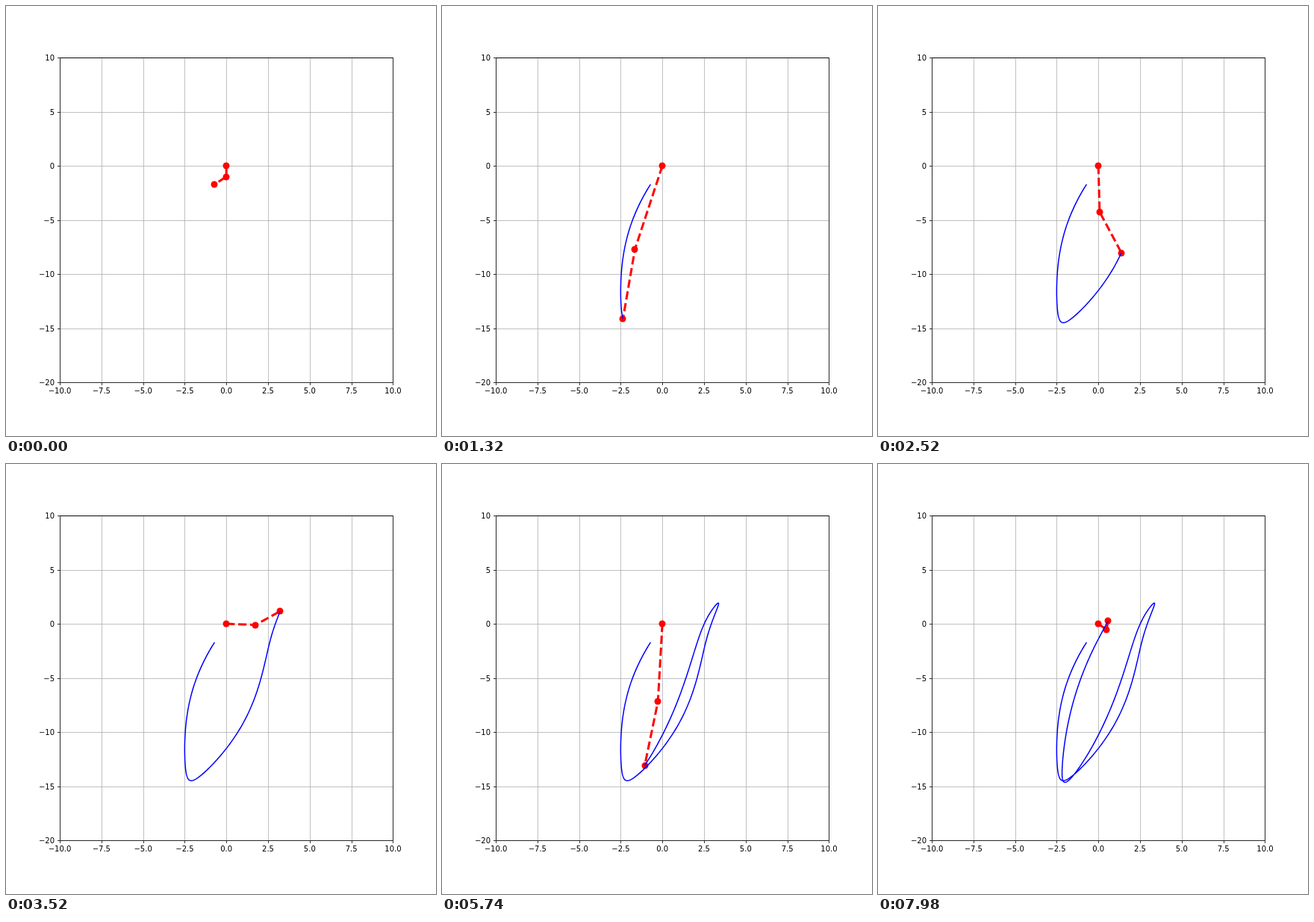
Animation, 576 px wide and 576 px high, one loop 8000 ms. Source, as an HTML page with a canvas:

```html
<!DOCTYPE html>
<html lang="en">
<head>
<meta charset="utf-8">
<title>Double spring pendulum</title>
<style>
  html, body { margin: 0; width: 100%; height: 100%; overflow: hidden; background: #fff; }
  canvas { display: block; width: 576px; height: 576px; }
</style>
</head>
<body>
<canvas id="stage" width="576" height="576"></canvas>
<script>
const ctx = document.getElementById('stage').getContext('2d');

const FRAME_MS = 20, FRAMES = 400, STEP = 20 / 999, SUBSTEPS = 8;
const G = 9.81, K = 10, M1 = 1, M2 = 2, REST = 1;
const LEFT = 72, RIGHT = 518.4, TOP = 69.12, BOTTOM = 504;

const toX = x => LEFT + (x + 10) * (RIGHT - LEFT) / 20;
const toY = y => BOTTOM - (y + 20) * (BOTTOM - TOP) / 30;
const snap = v => Math.round(v) + 0.5;

// State: x1, y1, x2, y2 followed by the four velocities.
function derivative([x1, y1, x2, y2, vx1, vy1, vx2, vy2]) {
  const dx = x2 - x1, dy = y2 - y1;
  const pull1 = K * (1 - REST / Math.hypot(x1, y1));
  const pull2 = K * (1 - REST / Math.hypot(dx, dy));
  return [
    vx1, vy1, vx2, vy2,
    (pull2 * dx - pull1 * x1) / M1,
    (pull2 * dy - pull1 * y1) / M1 - G,
    -pull2 * dx / M2,
    -pull2 * dy / M2 - G
  ];
}

function rungeKutta(s, h) {
  const add = (d, f) => s.map((v, i) => v + d[i] * f);
  const a = derivative(s);
  const b = derivative(add(a, h / 2));
  const c = derivative(add(b, h / 2));
  const d = derivative(add(c, h));
  return s.map((v, i) => v + h / 6 * (a[i] + 2 * b[i] + 2 * c[i] + d[i]));
}

// Both springs start at rest length, each stretching at speed 5.
function simulate() {
  const r = Math.SQRT1_2, speed = 5;
  let s = [0, -1, -r, -1 - r, 0, -speed, -speed * r, -speed - speed * r];
  const poses = [];
  for (let i = 0; i < FRAMES; i++) {
    poses.push([[toX(0), toY(0)], [toX(s[0]), toY(s[1])], [toX(s[2]), toY(s[3])]]);
    for (let j = 0; j < SUBSTEPS; j++) s = rungeKutta(s, STEP / SUBSTEPS);
  }
  return poses;
}

function polyline(points, color, width, dash = []) {
  ctx.beginPath();
  points.forEach(([x, y]) => ctx.lineTo(x, y));
  ctx.strokeStyle = color;
  ctx.lineWidth = width;
  ctx.setLineDash(dash);
  ctx.stroke();
}

function drawAxes() {
  const l = snap(LEFT), r = snap(RIGHT), t = snap(TOP), b = snap(BOTTOM);
  const label = (v, digits) => v.toFixed(digits).replace('-', '\u2212');
  ctx.font = '10px "DejaVu Sans", sans-serif';
  ctx.fillStyle = '#000';
  ctx.textAlign = 'center';
  for (let v = -10; v <= 10; v += 2.5) {
    const x = snap(toX(v));
    polyline([[x, t], [x, b]], '#b0b0b0', 0.8);
    polyline([[x, b], [x, b + 3.5]], '#000', 0.8);
    ctx.fillText(label(v, 1), toX(v), 519);
  }
  ctx.textAlign = 'right';
  for (let v = -20; v <= 10; v += 5) {
    const y = snap(toY(v));
    polyline([[l, y], [r, y]], '#b0b0b0', 0.8);
    polyline([[l - 3.5, y], [l, y]], '#000', 0.8);
    ctx.fillText(label(v, 0), 65, Math.round(toY(v)) + 4);
  }
  polyline([[l, t], [r, t], [r, b], [l, b], [l, t], [r, t]], '#000', 0.8);
}

function draw(frame) {
  ctx.fillStyle = '#fff';
  ctx.fillRect(0, 0, 576, 576);
  drawAxes();
  polyline(poses[frame], '#f00', 3, [11.1, 4.8]);
  ctx.fillStyle = '#f00';
  for (const [x, y] of poses[frame]) {
    ctx.beginPath();
    ctx.arc(Math.round(x), Math.round(y), 4.5, 0, 2 * Math.PI);
    ctx.fill();
  }
  polyline(poses.slice(0, frame + 1).map(pose => pose[2]), '#00f', 1.5);
}

const poses = simulate();
ctx.lineJoin = 'round';
const start = performance.now();

function tick() {
  const elapsed = Math.max(0, performance.now() - start);
  draw(Math.floor(elapsed / FRAME_MS) % FRAMES);
  requestAnimationFrame(tick);
}
tick();
</script>
</body>
</html>
```
